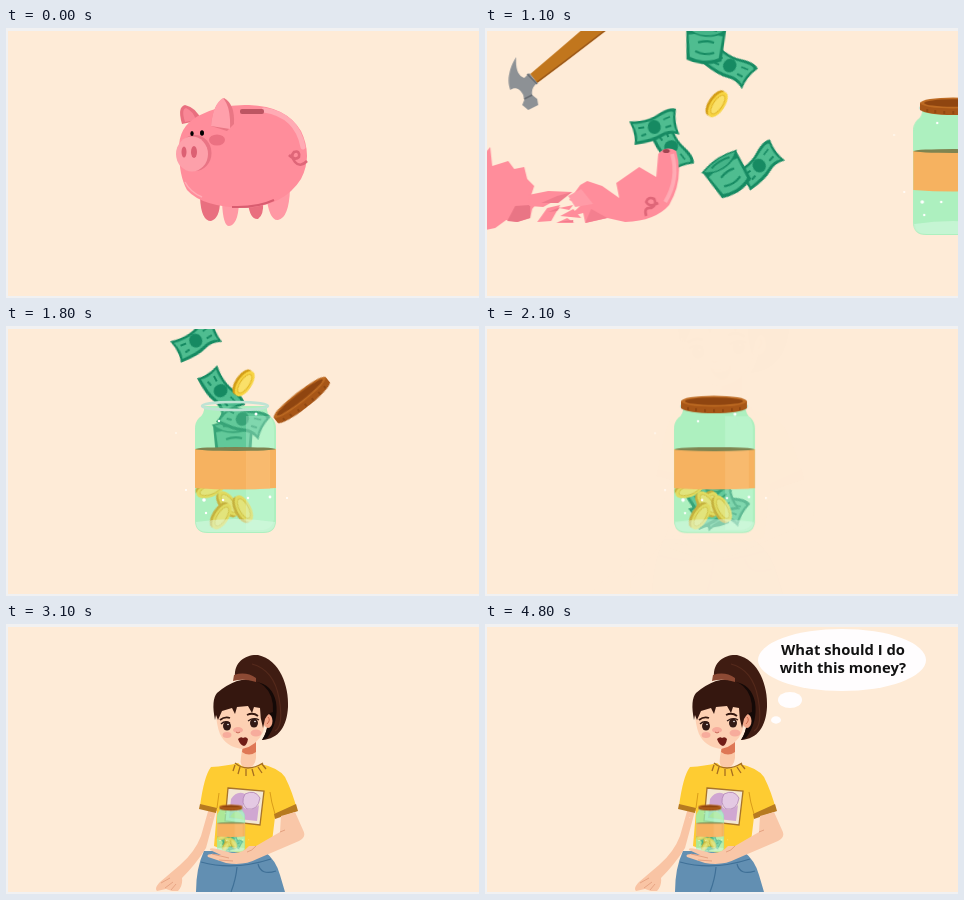
These frames come from a looping animation (473 by 270 pixels, 5 s). An HTML page without scripts:

```html
<!DOCTYPE html>
<html lang="en">
<head>
<meta charset="utf-8">
<title>Savings</title>
<style>
html, body { margin: 0; width: 100%; height: 100%; overflow: hidden; background: #f1f1f2; }
svg { display: block; width: 473px; height: 270px; }
.anim, .fly, .drop { animation: 5s linear infinite both; }
.pan { animation-name: pan; }
.whole { animation-name: whole; }
.broken { animation-name: broken; }
.left { --from: translate(62px, -32px) rotate(8deg); transform-origin: 130px 165px; animation-name: split; }
.right { --from: translate(-32px, -26px) rotate(-8deg); transform-origin: 285px 165px; animation-name: split; }
.hammer { transform-origin: 290px -15px; animation-name: swing; }
.fly { animation-name: fly; }
.drop { animation-name: drop; animation-delay: var(--d, 0s); }
.lid { transform-origin: 229px 77px; animation-name: lid; }
.jar { transform-origin: 229.5px 207px; animation-name: jar; }
.girl { transform-origin: 237px 255px; animation-name: girl; }
.smile { animation-name: smile; }
.ask { animation-name: ask; }
.pop { transform-box: fill-box; transform-origin: 20% 90%; animation-name: pop; animation-delay: var(--d, 0s); }
.talk { animation-name: talk; }
text { font: 700 14.75px "Open Sans", "Noto Sans", sans-serif; text-anchor: middle; fill: #111; }

@keyframes pan {
  0%, 14% { transform: none; }
  16% { transform: translateX(-8px); }
  18% { transform: translateX(-33px); }
  20% { transform: translateX(-78px); }
  22% { transform: translateX(-141px); }
  24% { transform: translateX(-218px); }
  26% { transform: translateX(-295px); }
  28% { transform: translateX(-352px); }
  30%, 100% { transform: translateX(-381px); }
}
@keyframes whole { 0%, 7.99% { opacity: 1; } 8%, 100% { opacity: 0; } }
@keyframes broken { 0%, 7.99% { opacity: 0; } 8%, 100% { opacity: 1; } }
@keyframes split { 0%, 8% { transform: var(--from); } 12%, 100% { transform: none; } }
@keyframes swing {
  0% { transform: rotate(75deg); }
  4% { transform: rotate(8deg); }
  6% { transform: rotate(4deg); animation-timing-function: ease-in; }
  8% { transform: rotate(-27deg); animation-timing-function: ease-out; }
  12%, 100% { transform: none; }
}
@keyframes fly {
  0%, 7.99% { opacity: 0; transform: translate(232px, 135px) scale(.5); }
  8% { opacity: 1; transform: translate(232px, 135px) scale(.5); animation-timing-function: ease-out; }
  12%, 14% { transform: translate(var(--a)) rotate(var(--r)); animation-timing-function: ease-in-out; }
  22% { opacity: 1; transform: translate(var(--b)) rotate(var(--s)); animation-timing-function: ease-in; }
  27%, 100% { opacity: 1; transform: translate(var(--b)) translateY(-210px) rotate(var(--s)); }
}
@keyframes drop {
  0%, 27% { transform: translate(var(--a)) rotate(var(--r)); }
  33%, 100% { transform: translate(var(--b)) rotate(var(--r)); }
}
@keyframes lid {
  0%, 26% { transform: none; }
  29% { transform: translate(28px, -40px) rotate(-18deg); }
  32%, 37% { transform: translate(66px, -4px) rotate(-38deg); }
  39.5% { transform: translate(30px, -30px) rotate(-18deg); }
  42%, 100% { transform: none; }
}
@keyframes jar {
  0%, 42% { transform: none; }
  48% { transform: translate(-2.5px, 14px) scale(.58); }
  58%, 100% { transform: translate(-4.5px, 21px) scale(.345); }
}
@keyframes girl {
  0%, 42% { opacity: 0; transform: scale(1.5); }
  45% { opacity: 1; transform: scale(1.25); }
  48%, 100% { opacity: 1; transform: none; }
}
@keyframes smile { 0%, 61.99% { opacity: 1; } 62%, 100% { opacity: 0; } }
@keyframes ask { 0%, 61.99% { opacity: 0; } 62%, 100% { opacity: 1; } }
@keyframes pop { 0%, 61.9% { transform: scale(0); } 65%, 100% { transform: none; } }
@keyframes talk { 0%, 71% { opacity: 0; } 74%, 100% { opacity: 1; } }
</style>
</head>
<body>
<svg viewBox="0 0 473 270">
  <defs>
    <g id="bill">
      <path d="M-24-7Q-7-4 5-10T24-13Q20 1 24 13Q14 9 6 13T-22 17Q-19 6-24-7Z" fill="#168a62"/>
      <path d="M-21-4Q-6-2 6-7.500T21-10Q18 1 21 9.500Q13 6.500 5 10T-19 14Q-17 6-21-4Z" fill="#4fbd90"/>
      <ellipse rx="6.500" ry="7" cy="2" fill="#168a62"/>
      <path d="M-16 1l6 0M-14 9l5-1M10-4l7-2M11 4l6-1" stroke="#168a62" stroke-width="1.800"/>
    </g>
    <g id="roll">
      <path d="M-20-14Q0-21 20-15L18 17Q0 25-17 18Z" fill="#168a62"/>
      <path d="M-17-7Q0-11 17-8L15 14Q0 21-14 15Z" fill="#4fbd90"/>
      <path d="M-20-14Q0-21 20-15Q12-7 0-7T-20-14Z" fill="#45b488" stroke="#168a62" stroke-width="1.500"/>
      <path d="M-10-13Q0-16 11-13M-7 0Q1-3 9-1M-9 9Q1 13 10 9" fill="none" stroke="#168a62" stroke-width="2.200"/>
    </g>
    <g id="coin">
      <ellipse cx="-1.800" rx="7" ry="14.500" fill="#d39d16"/>
      <ellipse cx="1" rx="7" ry="14.500" fill="#f7d443"/>
      <ellipse cx="1" rx="4.500" ry="11" fill="#fae069" stroke="#e2b526"/>
    </g>
    <path id="glass" d="M198 80H261Q260 88 266 92Q270 96 270 103V194Q270 207 257 207H202Q189 207 189 194V103Q189 96 193 92Q199 88 198 80Z"/>
  </defs>

  <rect x="2" y="3" width="471" height="265" fill="#feebd7"/>

  <!-- girl -->
  <g class="anim girl">
    <path d="M229 52C228 38 240 30 252 31C274 36 283 62 282 83C281 102 273 115 256 116Q266 101 262 72L246 57Z" fill="#3f1c12"/>
    <path d="M250 58Q266 60 270 78Q273 98 261 114L256 116Q266 101 260 72Z" fill="#140907"/>
    <path d="M246 40Q268 46 273 74T269 107" fill="none" stroke="#54291b" stroke-width="1.200"/>
    <path d="M237 119L250 110V134Q249 143 241 145Q233 143 235 133Z" fill="#fbc9a8"/>
    <path d="M237 122Q246 122 250 114V128Q243 133 236 128Z" fill="#de7755"/>
    <path d="M203 184L195 212Q189 228 174 241L154 258Q148 264 151 267L160 265L166 267H172Q177 262 176 254Q190 240 200 224L210 187Z" fill="#f9c4a4"/>
    <path d="M155 259l9-5M159 264l8-6M165 266l5-6" stroke="#e39c7b" stroke-width=".8"/>
    <path d="M198 227H258Q270 236 274 251L279 268H190Q190 244 198 227Z" fill="#628fb2"/>
    <path d="M195 238Q228 247 265 235M231 243Q230 255 225 268M252 240Q255 252 270 247" fill="none" stroke="#3f7097" stroke-width="1.200"/>
    <path d="M205 143Q220 142 232 139Q242 149 255 140Q273 144 279 153Q287 169 291 186L269 193L265 226Q235 234 208 222L211 187L194 182Q198 152 205 143Z" fill="#fecc32"/>
    <path d="M194 180L211 184L210 189L193 185ZM290 180L292 187L269 195L268 190Z" fill="#b77a20"/>
    <path d="M269 190Q265 177 264 168M211 184L213 169" fill="none" stroke="#d99c19"/>
    <path d="M229 139Q241 149 257 139M229 141l-2 6M234 143l-2 7M240 145v7M246 145l2 7M252 143l4 6M256 140l4 5" fill="none" stroke="#a66e20" stroke-width="1.300"/>
    <path d="M222 164L258 167L254 201L219 197Z" fill="#f3e7d3" stroke="#a7742b" stroke-width="1.300"/>
    <path d="M225 175Q231 166 239 170L237 182Q243 190 253 181L251 197L223 194Z" fill="#d0a7d2"/>
    <path d="M239 170Q249 165 254 174Q252 187 241 185Q234 179 239 170Z" fill="#e4c9e3" stroke="#b184b7" stroke-width=".8"/>
    <path d="M224 193Q231 181 239 196Z" fill="#f3c94a"/>
    <path d="M210 86Q210 100 214 110Q220 123 236 125Q251 122 257 108L263 84L242 74Z" fill="#fdd0b3"/>
    <ellipse cx="262" cy="97" rx="4.500" ry="7" fill="#f4a98b"/>
    <path d="M262 93q3 3-1 7" fill="none" stroke="#ce6a4e"/>
    <path d="M209 96Q205 76 211 69Q220 61 231 57Q247 53 258 62Q268 71 267 88Q262 89 259 95L257 104Q254 94 254 84L248 83L246 89L242 82L231 83L229 90L226 84L216 87L212 96L210 91Z" fill="#35170f"/>
    <path d="M228 51Q240 47 250 54L250 58Q238 54 227 57Z" fill="#8d4a34"/>
    <path d="M214 96q5-4 10-2M241 91q6-3 11 1" fill="none" stroke="#35170f" stroke-width="1.800"/>
    <ellipse cx="221" cy="102" rx="4" ry="4.600" fill="#321a16"/>
    <ellipse cx="248" cy="99" rx="4" ry="4.600" fill="#321a16"/>
    <path d="M215 100q4-4 9-1M242 97q6-4 11-1" fill="none" stroke="#321a16" stroke-width="1.300"/>
    <circle cx="222" cy="100.500" r=".8" fill="#fff"/><circle cx="249" cy="97.500" r=".8" fill="#fff"/>
    <g fill="#f49a91" opacity=".65">
      <ellipse cx="221" cy="111" rx="4.500" ry="3"/><ellipse cx="250" cy="109" rx="5.500" ry="3.500"/><ellipse cx="232" cy="106" rx="5" ry="3"/>
    </g>
    <path d="M230 108q2 2 4 0" fill="none" stroke="#c86b59"/>
    <g class="anim smile">
      <path d="M229 113Q237 115 243 111Q243 120 237 121Q232 120 229 113Z" fill="#7c2018"/>
      <path d="M231 114Q237 115 242 112L241 114Q236 116 232 115Z" fill="#fff"/>
    </g>
    <path class="anim ask" d="M232 115Q235 112 237 114Q240 112 242 115Q241 121 238 122Q234 121 232 115Z" fill="#711d17"/>
  </g>

  <!-- whole pig -->
  <g class="anim whole">
    <path d="M194 169Q195 193 205 193Q214 190 214 173ZM242 175Q244 192 252 191Q258 187 257 174Z" fill="#e96f7f"/>
    <path d="M176 96Q171 79 179 77Q191 80 195 92Z" fill="#e96f7f"/>
    <path d="M179 94Q175 81 180 80Q187 83 190 92Z" fill="#f98796"/>
    <path d="M216 174Q217 198 223 198Q232 197 233 175ZM260 166Q263 193 272 192Q283 190 284 161Z" fill="#ff98a4"/>
    <path d="M173 122Q172 99 192 88Q214 76 243 77Q280 78 295 103Q307 128 295 151Q278 178 239 180Q196 179 181 162Q173 148 173 122Z" fill="#ff8d9b"/>
    <path d="M258 82Q291 87 297 119" fill="none" stroke="#ffabb4" stroke-width="5" stroke-linecap="round"/>
    <path d="M226 179Q251 180 268 172" fill="none" stroke="#d95d70" stroke-width="2"/>
    <path d="M179 154Q184 164 196 169" fill="none" stroke="#ffabb4" stroke-width="1.500"/>
    <rect x="234" y="81" width="24" height="5" rx="2" fill="#bd5562"/>
    <path d="M205 98Q207 76 218 70Q229 76 228 96L221 103Z" fill="#e97684"/>
    <path d="M205 98Q207 76 217 70Q225 79 224 101Z" fill="#ffa0ab"/>
    <ellipse cx="211" cy="112" rx="8" ry="5.500" fill="#eb7182"/>
    <ellipse cx="189" cy="125" rx="16.500" ry="18" fill="#e97585"/>
    <ellipse cx="186" cy="126" rx="16" ry="17.500" fill="#fda0aa"/>
    <ellipse cx="178" cy="124" rx="2.500" ry="5.500" fill="#dc6073"/><ellipse cx="188" cy="124" rx="3" ry="6" fill="#dc6073"/>
    <ellipse cx="186" cy="105.500" rx="1.700" ry="2.600"/><ellipse cx="196" cy="105" rx="2" ry="2.800"/>
    <path d="M301 133Q294 140 289 134Q284 128 288 124Q294 122 293 129Q289 133 283 127" fill="none" stroke="#df6678" stroke-width="2.600"/>
  </g>

  <!-- flying cash -->
  <g>
    <use href="#bill" class="fly" style="--a:181px,126px;--b:188px,118px;--r:76deg;--s:68deg"/>
    <use href="#bill" class="fly" style="--a:229px,122px;--b:246px,36px;--r:58deg;--s:38deg"/>
    <use href="#bill" class="fly" style="--a:274px,138px;--b:273px,136px;--r:-32deg;--s:-36deg"/>
    <use href="#roll" class="fly" style="--a:250px,143px;--b:242px,146px;--r:24deg;--s:-32deg"/>
    <use href="#bill" class="fly" style="--a:184px,143px;--b:169px,97px;--r:8deg;--s:-8deg"/>
    <use href="#roll" class="fly" style="--a:213px,140px;--b:220px,15px;--r:0deg;--s:5deg"/>
    <use href="#coin" class="fly" style="--a:194px,152px;--b:205px,-30px;--r:18deg;--s:60deg"/>
    <use href="#coin" class="fly" style="--a:208px,156px;--b:250px,-35px;--r:68deg;--s:20deg"/>
    <use href="#coin" class="fly" style="--a:241px,150px;--b:232px,76px;--r:-22deg;--s:34deg"/>
    <use href="#coin" class="fly" style="--a:261px,152px;--b:240px,-40px;--r:-28deg;--s:40deg"/>
  </g>

  <g class="anim pan">
    <!-- broken pig -->
    <g class="anim broken">
      <g class="anim left">
        <path d="M72 177Q77 163 96 164L98 184Q82 182 72 177Z" fill="#ea7282"/>
        <path d="M94 133Q103 126 116 125L132 137L147 119L149 138L165 133L171 141L181 139L184 151L191 158L187 170L200 167L189 181L187 190L174 194L163 192L152 200Q126 207 106 193Q85 178 86 158Q88 143 94 133Z" fill="#ff8d9b"/>
        <path d="M164 193L172 178L187 177L187 190L174 194Z" fill="#e97585"/>
        <path d="M80 146Q86 126 96 118Q101 130 113 132Q100 149 80 146Z" fill="#ffa0ab"/>
        <path d="M90 130L96 118L98 126Z" fill="#e97585"/>
        <ellipse cx="114" cy="154" rx="7" ry="6" fill="#eb7182"/>
        <ellipse cx="122" cy="181" rx="16" ry="18" transform="rotate(-22 122 181)" fill="#e97585"/>
        <ellipse cx="120" cy="183" rx="15" ry="17" transform="rotate(-22 120 183)" fill="#fda0aa"/>
        <g fill="#dc6073"><ellipse cx="115" cy="181" rx="5.500" ry="2.800" transform="rotate(24 115 181)"/><ellipse cx="117" cy="190" rx="5" ry="2.500" transform="rotate(24 117 190)"/></g>
        <path d="M100 163l6 4M105 162l-3 7M96 175l7 4M101 173l-3 7" stroke="#111" stroke-width="1.500"/>
      </g>
      <path d="M185 167L205 163L229 164L211 173L200 179L186 178ZM194 194L204 180L217 177L208 193ZM216 180L230 177L226 182ZM213 195L224 190L231 195ZM217 188L230 181L238 190Z" fill="#ff8d9b"/>
      <path d="M198 175L214 168L229 164L215 175ZM215 194h15v-2ZM205 184l12-5-3 4Z" fill="#f07c8c"/>
      <g class="anim right">
        <path d="M226 172L237 157L244 153L259 158L276 170L273 155L296 139L313 149L315 126Q323 117 333 123Q341 151 326 177Q312 193 282 194L264 190L242 195L240 185L225 189L238 177Z" fill="#ff8d9b"/>
        <path d="M329 126Q336 151 322 174" fill="none" stroke="#ffabb4" stroke-width="4"/>
        <path d="M225 168L238 161L250 176L232 179Z" fill="#ff9ba7"/>
        <path d="M242 195L248 181L264 190Z" fill="#f47f8f"/>
        <ellipse cx="323" cy="123" rx="3.500" ry="2" fill="#a34350"/>
        <path d="M303 188Q300 179 308 180Q314 177 311 171Q305 168 303 174Q306 180 315 175" fill="none" stroke="#df6678" stroke-width="2.600"/>
      </g>
    </g>

    <!-- hammer -->
    <g class="anim hammer">
      <path d="M187 46L194 55L222 34L295-22L285-38L214 23Z" fill="#c1761d"/>
      <path d="M194 54L222 33L295-23" fill="none" stroke="#99571a" stroke-width="1.500"/>
      <path d="M173 29C165 41 164 54 167 62C172 58 177 61 180 67L181 72L179 77L185 82L195 77L194 71L189 67C188 62 190 58 194 55L186 45L181 50C175 48 172 41 173 29Z" fill="#8d9195"/>
      <path d="M181 71L189 67M184 46L194 56" stroke="#696d72" stroke-width="1.500"/>
    </g>

    <!-- jar -->
    <g transform="translate(381)">
      <g class="anim jar">
        <use href="#glass" fill="#8ff2b8" opacity=".68"/>
        <use href="#roll" class="drop" style="--a:230px,-80px;--b:226px,180px;--r:0deg;--d:.228s"/>
        <use href="#bill" class="drop" style="--a:236px,-80px;--b:238px,178px;--r:28deg;--d:.252s"/>
        <use href="#bill" class="drop" style="--a:208px,-60px;--b:224px,178px;--r:62deg;--d:.295s"/>
        <use href="#bill" class="drop" style="--a:172px,-60px;--b:228px,180px;--r:-22deg;--d:.36s"/>
        <use href="#coin" class="drop" style="--a:252px,-50px;--b:222px,178px;--r:34deg;--d:.31s"/>
        <use href="#coin" class="drop" style="--a:210px,-40px;--b:204px,163px;--r:70deg"/>
        <use href="#coin" class="drop" style="--a:226px,-40px;--b:222px,178px;--r:-38deg;--d:.02s"/>
        <use href="#coin" class="drop" style="--a:222px,-50px;--b:215px,190px;--r:32deg;--d:.05s"/>
        <use href="#coin" class="drop" style="--a:236px,-50px;--b:237px,183px;--r:-28deg;--d:.08s"/>
        <use href="#glass" fill="#9cf0b8" opacity=".25"/>
        <path d="M240 90H264Q268 96 268 103V194Q266 203 257 204H240Z" fill="#dcffe7" opacity=".25"/>
        <path d="M190 196Q229 190 269 196Q269 206 257 206H202Q190 206 190 196Z" fill="#e3fbea" opacity=".45"/>
        <path d="M189 123H270V162Q229 165 189 162Z" fill="#f6b260"/>
        <path d="M240 124H264V163H240Z" fill="#fbc47c" opacity=".5"/>
        <ellipse cx="229.500" cy="123" rx="40" ry="2" fill="#7f8450"/>
        <ellipse cx="229" cy="80" rx="33" ry="4" fill="none" stroke="#bfe3d4" stroke-width="2.500"/>
        <g fill="#fff">
          <circle cx="198" cy="174" r="1.800"/><circle cx="217" cy="174" r="1.300"/><circle cx="200" cy="187" r="1.200"/>
          <circle cx="242" cy="172" r="1.200"/><circle cx="264" cy="171" r="1.400"/><circle cx="250" cy="88" r="1.500"/>
          <circle cx="213" cy="95" r="1.200"/><circle cx="180" cy="164" r="1"/><circle cx="281" cy="172" r="1"/><circle cx="170" cy="107" r=".8"/>
        </g>
        <g class="anim lid">
          <path d="M196 75V82Q203 87 229 87T262 82V75Z" fill="#a75617"/>
          <ellipse cx="229" cy="75" rx="33" ry="5.500" fill="#bd6a22"/>
          <ellipse cx="229" cy="75" rx="29" ry="3.700" fill="#8f4510"/>
          <path d="M203 81v3M211 82v3M220 83v3M229 83v3M238 83v3M247 82v3M255 81v3" stroke="#7c3b0d"/>
        </g>
      </g>
    </g>
  </g>

  <!-- holding hand -->
  <g class="anim girl">
    <path d="M275 192L289 188L297 206Q301 213 293 217L251 235Q238 242 220 239L202 233Q200 230 206 230L215 231L204 226Q203 223 211 225L226 229Q236 230 243 222L250 222L274 208Z" fill="#f9c7a8"/>
    <path d="M206 230l17 4M213 236l14 1M250 222q-4 5-9 6M274 208l5-2" fill="none" stroke="#e39c7b" stroke-width=".9"/>
  </g>

  <!-- thought -->
  <g fill="#fffdfe">
    <ellipse class="anim pop" cx="291" cy="96" rx="5" ry="3.700"/>
    <ellipse class="anim pop" style="--d:.1s" cx="305" cy="76" rx="12" ry="8"/>
    <ellipse class="anim pop" style="--d:.25s" cx="357" cy="36" rx="84" ry="31"/>
  </g>
  <g class="anim talk">
    <text x="358" y="31">What should I do</text>
    <text x="358" y="49">with this money?</text>
  </g>

  <path d="M0 0H473V270H0ZM2 3V268H473V3Z" fill="#f1f1f2" fill-rule="evenodd"/>
</svg>
</body>
</html>
```
